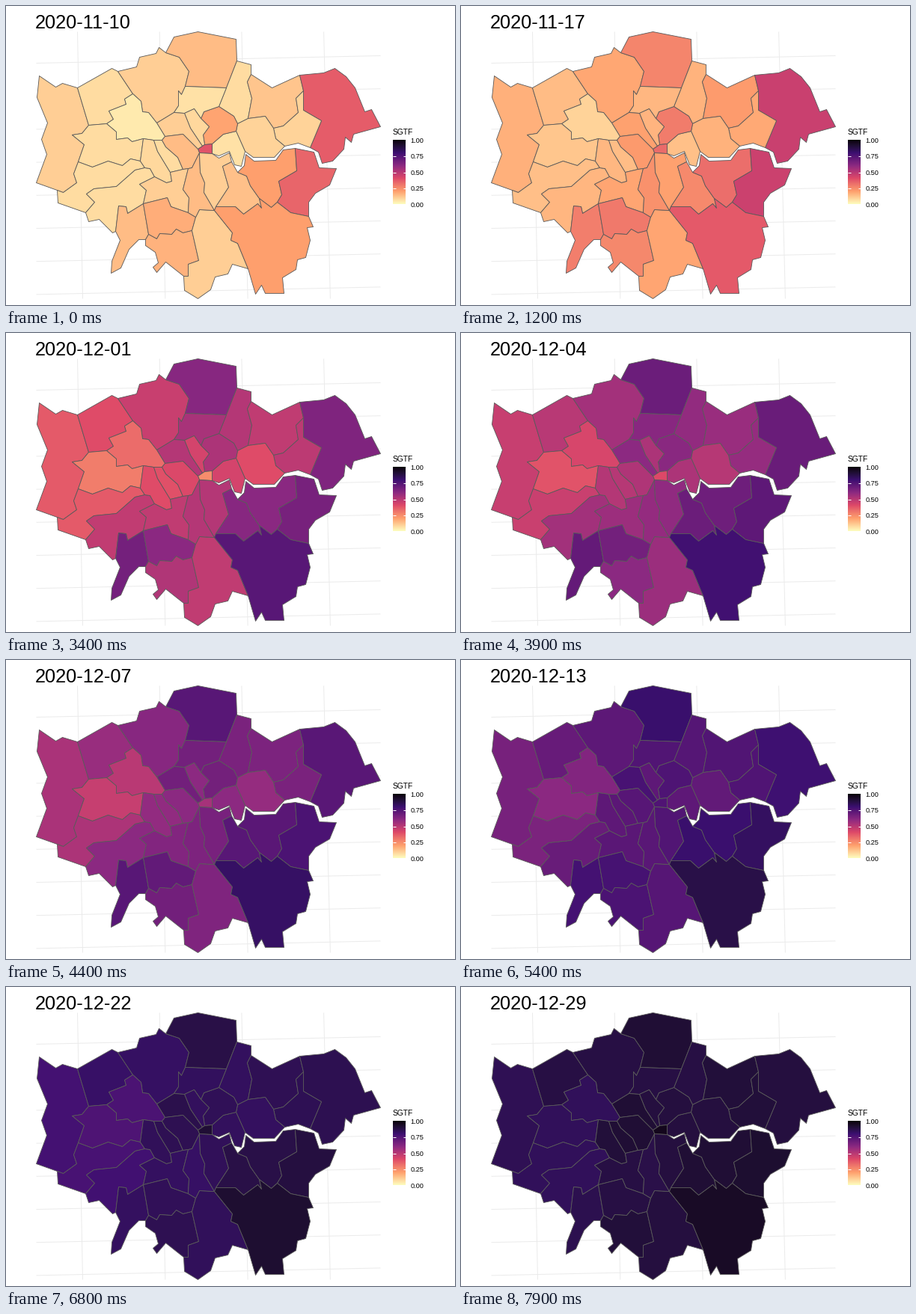
A matplotlib script for the animation above (10000 ms loop, 600x400 px).

```python
import math

import numpy as np
import matplotlib.pyplot as plt
from matplotlib.animation import FuncAnimation
from matplotlib.collections import LineCollection, PolyCollection
from matplotlib.colors import to_rgb

W, H = 600, 400
PX = 0.72  # points per pixel at 100 dpi
FRAMES, LAST = 100, 79
DAYS, MIDDLE = 49, 21
START = np.datetime64("2020-11-10")
FONT = "Liberation Sans"

# Colour scale, interpolated evenly in a perceptual (CIELAB) space
STOPS = ["#FCFDBF", "#FE9F6D", "#DE4968", "#8C2981", "#3B0F70", "#000004"]
XYZ = np.array([[.4124, .3576, .1805], [.2126, .7152, .0722], [.0193, .1192, .9505]])
WHITE = XYZ.sum(axis=1)


def to_lab(rgb):
    rgb = np.asarray(rgb)
    lin = np.where(rgb > .04045, ((rgb + .055) / 1.055) ** 2.4, rgb / 12.92)
    t = lin @ XYZ.T / WHITE
    return np.where(t > .008856, np.cbrt(t), 7.787 * t + 16 / 116)


def from_lab(f):
    t = np.where(f > .2069, f ** 3, (f - 16 / 116) / 7.787)
    lin = np.clip((t * WHITE) @ np.linalg.inv(XYZ).T, 0, 1)
    return np.clip(np.where(lin > .0031308, 1.055 * lin ** (1 / 2.4) - .055, 12.92 * lin), 0, 1)


LAB = to_lab([to_rgb(c) for c in STOPS])


def palette(v):
    at = np.linspace(0, 1, len(STOPS))
    return from_lab(np.stack([np.interp(v, at, LAB[:, k]) for k in range(3)], axis=-1))


# The city's outline, clockwise: north of the river, then back along the south
north = [(44, 93), (66, 108), (75, 103), (95, 109), (141, 83), (149, 87), (174, 81), (178, 68),
         (200, 63), (204, 55), (213, 62), (224, 41), (256, 34), (307, 44), (308, 73), (327, 78),
         (327, 91), (355, 109), (392, 92), (424, 89), (439, 83), (454, 94), (466, 109),
         (479, 141), (488, 138), (500, 161), (464, 171), (461, 182), (453, 175), (451, 191),
         (436, 207), (422, 210), (417, 195), (406, 189), (390, 183), (372, 187), (358, 202),
         (330, 202), (319, 194), (314, 214), (305, 212), (298, 194), (284, 200)]
south = [(275, 197), (284, 203), (298, 196), (301, 208), (309, 222), (318, 213), (320, 198),
         (331, 207), (360, 206), (370, 192), (386, 190), (411, 195), (418, 216), (441, 217),
         (432, 239), (413, 250), (404, 262), (404, 281), (410, 295), (402, 296), (406, 313),
         (400, 336), (389, 339), (387, 352), (369, 363), (371, 384), (346, 384), (341, 373),
         (333, 385), (323, 351), (302, 345), (296, 358), (279, 362), (273, 379), (256, 391),
         (238, 380), (237, 361), (213, 342), (201, 356), (196, 349), (203, 343), (199, 329),
         (186, 320), (186, 312), (177, 312), (164, 325), (153, 350), (140, 357), (141, 341),
         (152, 313), (146, 301), (142, 303), (124, 285), (110, 288), (106, 276), (69, 263),
         (68, 246), (40, 236), (54, 198), (47, 178), (55, 156), (41, 122)]
land = north + south
shapes, shares = [], []


def corner(p):
    return min(range(len(land)), key=lambda k: math.dist(land[k], p))


def peel(first, middle, last, *border):
    """Cut a borough off the remaining land along its inner border.

    The three levels are percentages on the first, middle and last day.
    """
    global land
    shares.append((first, middle, last))
    i = corner(border[0])
    land = land[i:] + land[:i]
    j = corner(border[-1])
    inner = list(border[1:-1])
    shapes.append(land[:j + 1] + inner[::-1])
    land = land[:1] + inner + land[j:]


# Hillingdon, Harrow, Barnet, Enfield
peel(10, 36, 85, (68, 246), (76, 249), (94, 236), (90, 224), (96, 208), (104, 185), (88, 172),
     (101, 170), (110, 159), (95, 109))
peel(7, 39, 88, (110, 159), (134, 157), (143, 151), (137, 140), (160, 131), (158, 124),
     (169, 117), (149, 87))
peel(10, 45, 88, (169, 117), (180, 127), (182, 141), (190, 142), (201, 156), (224, 142),
     (230, 133), (230, 113), (234, 118), (239, 107), (244, 87), (231, 68), (213, 62))
peel(14, 61, 91, (239, 107), (294, 109), (308, 73))
# Waltham Forest, Redbridge, Havering, Barking
peel(7, 50, 88, (294, 109), (284, 134), (304, 147), (309, 157), (323, 150), (328, 123),
     (322, 101), (327, 91))
peel(12, 47, 90, (323, 150), (346, 147), (357, 163), (370, 160), (390, 142), (387, 123),
     (397, 113), (392, 92))
peel(36, 63, 89, (397, 113), (397, 139), (421, 153), (406, 189))
peel(9, 48, 90, (357, 163), (360, 177), (372, 187))
# Newham, Tower Hamlets, Hackney, Haringey
peel(9, 39, 89, (309, 157), (307, 167), (319, 194))
peel(6, 42, 89, (307, 167), (290, 171), (275, 184), (275, 197))
peel(19, 52, 89, (284, 134), (264, 141), (260, 150), (271, 161), (263, 172), (265, 185),
     (275, 184))
peel(6, 53, 88, (224, 142), (238, 143), (251, 137), (260, 150))
# Islington, Camden, City, Brent
peel(8, 42, 89, (238, 143), (246, 163), (262, 187), (265, 185))
peel(10, 50, 91, (201, 156), (212, 174), (236, 171), (256, 191), (262, 187))
peel(38, 24, 96, (256, 191), (258, 196), (275, 197))
peel(4, 32, 84, (134, 157), (147, 168), (147, 178), (162, 176), (168, 181), (183, 177),
     (197, 179), (208, 179), (212, 174))
# Ealing, Hounslow, Richmond, Kingston
peel(7, 28, 84, (96, 208), (115, 215), (136, 207), (155, 213), (166, 204), (179, 207),
     (183, 177))
peel(7, 36, 84, (106, 276), (118, 262), (107, 251), (117, 244), (147, 241), (172, 219),
     (185, 216), (179, 207))
peel(7, 47, 84, (146, 301), (150, 267), (160, 268), (162, 277), (183, 264), (187, 246),
     (178, 238), (198, 228), (192, 217), (185, 216))
peel(14, 66, 86, (186, 312), (190, 305), (183, 264))
# Hammersmith, Kensington, Westminster, Wandsworth
peel(8, 39, 90, (198, 228), (214, 236), (221, 234), (219, 222), (202, 194), (197, 179))
peel(7, 38, 91, (219, 222), (236, 218), (229, 202), (213, 188), (208, 179))
peel(14, 40, 91, (236, 218), (243, 217), (248, 216), (258, 196))
peel(10, 47, 88, (183, 264), (215, 256), (220, 268), (243, 276), (244, 256), (236, 245),
     (243, 217))
# Merton, Sutton, Croydon, Lambeth
peel(17, 60, 88, (190, 305), (201, 311), (205, 304), (221, 305), (227, 298), (236, 303),
     (248, 300), (253, 282), (243, 276))
peel(16, 51, 90, (237, 361), (243, 361), (243, 345), (257, 340), (248, 300))
peel(10, 47, 89, (323, 351), (309, 317), (300, 313), (302, 303), (278, 273), (258, 272),
     (253, 282))
peel(14, 50, 87, (278, 273), (264, 249), (265, 236), (259, 222), (258, 196))
# Southwark, Lewisham, Greenwich, Bexley
peel(10, 50, 89, (278, 273), (280, 268), (297, 242), (289, 214), (301, 208))
peel(13, 61, 91, (280, 268), (306, 268), (317, 278), (336, 264), (341, 270), (338, 257),
     (326, 240), (321, 227), (309, 222))
peel(20, 60, 91, (338, 257), (354, 269), (362, 262), (368, 252), (364, 234), (388, 220),
     (386, 190))
peel(34, 65, 92, (362, 262), (380, 276), (404, 281))
# Bromley is what remains
shapes.append(land)
shares.append((20, 73, 94))

ODDS = np.array(shares) / 100
ODDS = np.log(ODDS / (1 - ODDS)).T


def fills(i):
    """Logistic growth, at one pace to the middle day and then slowing down."""
    day = i * DAYS / LAST
    first, middle, last = ODDS
    if day < MIDDLE:
        z = first + (middle - first) * day / MIDDLE
    else:
        z = middle + (last - middle) * ((day - MIDDLE) / (DAYS - MIDDLE)) ** .8
    return palette(1 / (1 + np.exp(-z)))


def date(i):
    return str(START + i * DAYS // LAST)


fig = plt.figure(figsize=(W / 100, H / 100), dpi=100, facecolor="white")
ax = fig.add_axes([0, 0, 1, 1])
ax.axis("off")

# Graticule
grid = [[(95 + 109.7 * k, 34), (102 + 110.3 * k, 391)] for k in range(4)]
grid += [[(40, 76 + 44.2 * k), (500, 66 + 44.2 * k)] for k in range(8)]
ax.add_collection(LineCollection(grid, colors="#EBEBEB", linewidths=PX))

regions = PolyCollection(shapes, facecolors=fills(0), edgecolors="#595959",
                         linewidths=.85 * PX, zorder=2)
ax.add_collection(regions)


def label(x, y, text, size):
    return ax.text(x, y, text, size=size * PX, family=FONT, color="black")


title = label(38.5, 30, date(0), 25.4)

# Colour bar
LEFT, RIGHT, TOP, BOTTOM = 516.5, 533.5, 179, 265
label(516.5, 172, "SGTF", 10.3)
ax.imshow(palette(np.linspace(1, 0, 300))[:, None], extent=(LEFT, RIGHT, BOTTOM, TOP),
          aspect="auto", interpolation="nearest")
for v in np.linspace(0, 1, 5):
    y = BOTTOM + (TOP - BOTTOM) * v
    label(540, y + 3.2, f"{v:.2f}", 9.1)
    if 0 < v < 1:
        ax.hlines([y, y], [LEFT, RIGHT - 3.5], [LEFT + 3.5, RIGHT],
                  colors="white", linewidths=PX, zorder=3)

ax.set_xlim(-.5, W - .5)
ax.set_ylim(H - .5, -.5)


def update(frame):
    i = min(frame, LAST)
    regions.set_facecolor(fills(i))
    title.set_text(date(i))
    return regions, title


anim = FuncAnimation(fig, update, frames=FRAMES, interval=100, repeat=True, repeat_delay=0)
plt.show()
```
